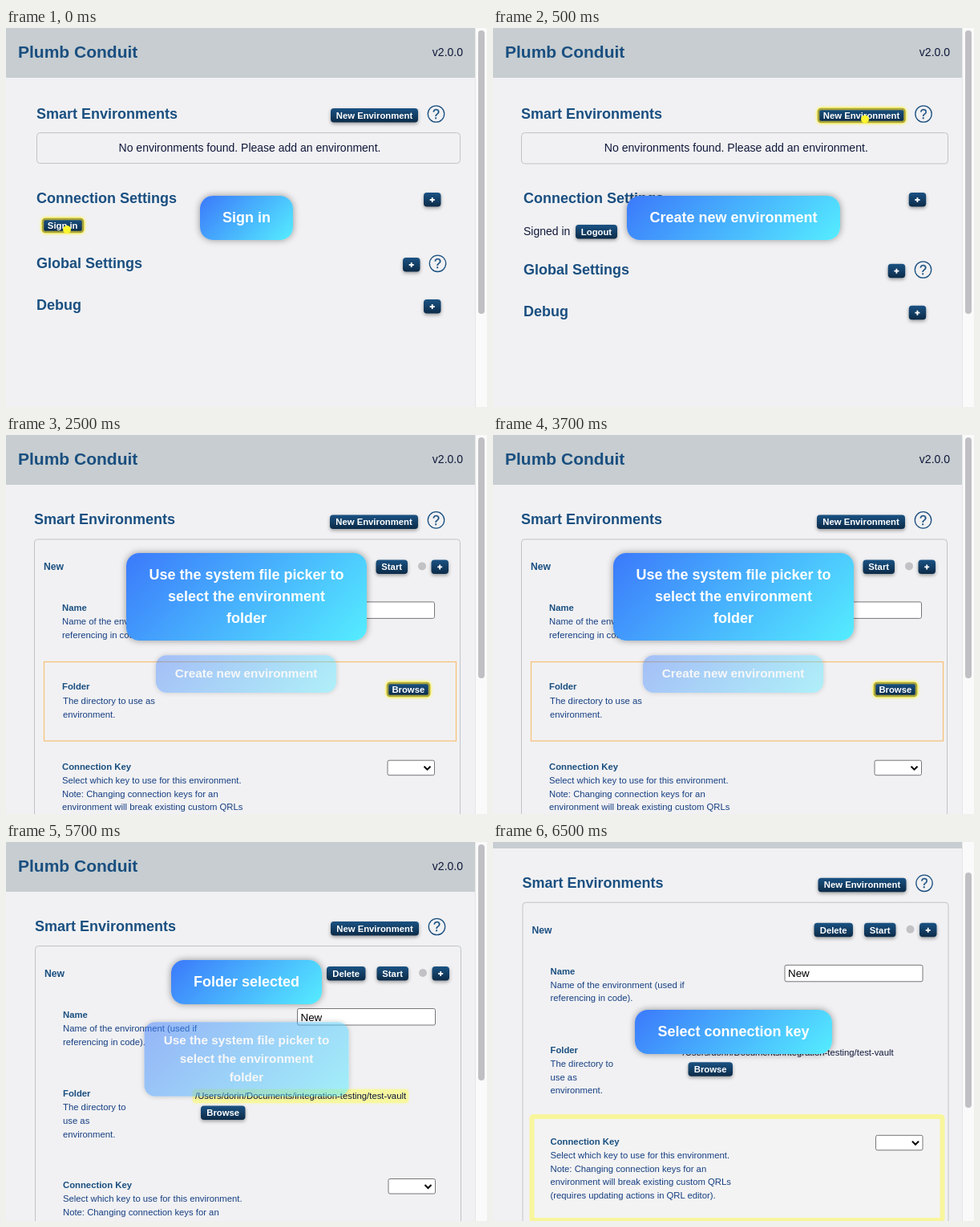
An HTML page for the animation above (8000 ms loop, 600 px wide and 472 px high).

```html
<!DOCTYPE html>
<html lang="en">
<head>
<meta charset="utf-8">
<title>Settings walkthrough</title>
<style>
  html, body { margin: 0; width: 100%; height: 100%; overflow: hidden; background: #f1f1f3; }
  body { font-family: "Liberation Sans", Arial, Helvetica, sans-serif; }

  .scene { position: absolute; left: 0; top: 0; width: 600px; height: 472px; overflow: hidden; opacity: 0; animation: 8s step-end infinite; }
  .scene svg { position: absolute; left: 0; top: 0; }
  #signin { animation-name: signin; }
  #create { animation-name: create; }
  #browse { animation-name: browse; }
  #picked { animation-name: picked; }
  #key    { animation-name: key; }
  @keyframes signin { 0% { opacity: 1 } 6.25%, 100% { opacity: 0 } }
  @keyframes create { 0% { opacity: 0 } 6.25% { opacity: 1 } 31.25%, 100% { opacity: 0 } }
  @keyframes browse { 0% { opacity: 0 } 31.25% { opacity: 1 } 56.25%, 100% { opacity: 0 } }
  @keyframes picked { 0% { opacity: 0 } 56.25% { opacity: 1 } 81.25%, 100% { opacity: 0 } }
  @keyframes key    { 0% { opacity: 0 } 81.25%, 100% { opacity: 1 } }

  .toasts { position: absolute; inset: 0; display: flex; flex-direction: column; align-items: center; justify-content: center; gap: 14px; }
  .toast {
    box-sizing: border-box; padding: 14px 28px; border-radius: 16px;
    font: bold 18px/27px "Liberation Sans", Arial, Helvetica, sans-serif;
    color: #fff; text-align: center; white-space: nowrap;
    background: linear-gradient(135deg, #3b79fb, #55edff);
    box-shadow: 0 0 8px rgba(0, 0, 0, .4);
  }
  .wide { width: 300px; }
  .old { transform: scale(.85); opacity: .42; }
  .old.wide { opacity: .5; }

  .h1 { font: bold 21px "Liberation Sans", Arial, sans-serif; fill: #1a4f80; }
  .h2 { font: bold 18px "Liberation Sans", Arial, sans-serif; fill: #1a4f80; }
  .h3 { font: bold 12.2px "Liberation Sans", Arial, sans-serif; fill: #1a4f80; }
  .h4 { font: bold 11.3px "Liberation Sans", Arial, sans-serif; fill: #1a4f80; }
  .p  { font-size: 14px; fill: #10183a; }
  .s  { font-size: 11.3px; fill: #163f82; }
  .path { font-size: 11.3px; fill: #10183a; }
  .val { font-size: 13.4px; fill: #000; }
  .lit .h4, .lit .s { fill: #1f57a3; }
  .b { fill: url(#navy); filter: drop-shadow(0 2px 2px rgba(0, 0, 0, .35)); }
  .hot { fill: url(#navy); stroke: #a9a43c; stroke-width: 2.5; filter: drop-shadow(0 0 1.5px #fff64a) drop-shadow(0 0 1.5px #fff64a); }
  .bt { font: bold 11.3px "Liberation Sans", Arial, sans-serif; fill: #fff; text-anchor: middle; }
  .box { fill: none; stroke: #c0c3c7; }
  .field { fill: #fff; stroke: #76767a; }
  .thumb { fill: #c0c0c4; }
  .dot { fill: #fbf52f; }
</style>
</head>
<body>

<svg width="600" height="472" style="position:absolute;left:0;top:0">
  <defs>
    <linearGradient id="navy" x2="0" y2="1">
      <stop stop-color="#1a5283"/><stop offset="1" stop-color="#0c2b48"/>
    </linearGradient>

    <g id="top">
      <rect width="585" height="62" fill="#c7cdd0"/>
      <text class="h1" x="15" y="37">Plumb Conduit</text>
      <text class="p" x="570" y="35" text-anchor="end">v2.0.0</text>
    </g>

    <g id="plus">
      <rect class="b" width="21.5" height="17.5" rx="4"/>
      <path d="M7.7 9H13.7M10.7 6V12" stroke="#fff" stroke-width="1.8"/>
    </g>

    <g id="help">
      <circle r="10.2" fill="none" stroke="#1a4f80" stroke-width="1.3"/>
      <text y="5.6" font-size="16" text-anchor="middle" fill="#1a4f80" stroke="#1a4f80" stroke-width=".3">?</text>
    </g>

    <g id="card">
      <text class="h2" x="36" y="111">Smart Environments</text>
      <rect class="b" x="405" y="99" width="110" height="17.5" rx="4"/>
      <text class="bt" x="460" y="111.5">New Environment</text>
      <use href="#help" x="537.5" y="105.5"/>
      <rect class="box" x="36.5" y="129.5" width="531" height="460" rx="4"/>
      <text class="h3" x="48" y="168">New</text>
      <rect class="b" x="462.5" y="155" width="39.5" height="17.5" rx="4"/>
      <text class="bt" x="482.2" y="168">Start</text>
      <circle cx="520" cy="163" r="5" fill="#c2c2c6"/>
      <use href="#plus" x="531.5" y="155"/>
      <text class="h4" x="71" y="219">Name</text>
      <text class="s" x="71" y="236">Name of the environment (used if</text>
      <text class="s" x="71" y="252.7">referencing in code).</text>
      <rect class="field" x="363.5" y="207.5" width="172" height="20.5" rx="2"/>
      <text class="val" x="367.5" y="222.5">New</text>
      <text class="h4" x="71" y="317">Folder</text>
    </g>

    <g id="folder">
      <rect class="b" x="400" y="155" width="48.5" height="17.5" rx="4"/>
      <text class="bt" x="424.2" y="168">Delete</text>
      <text class="s" x="71" y="334">The directory to</text>
      <text class="s" x="71" y="351">use as</text>
      <text class="s" x="71" y="367.5">environment.</text>
      <text class="path" x="236" y="320">/Users/dorin/Documents/integration-testing/test-vault</text>
      <rect class="b" x="243" y="328.5" width="55.5" height="17.5" rx="4"/>
      <text class="bt" x="270.7" y="341">Browse</text>
    </g>

    <g id="keys">
      <text class="h4" x="71" y="431">Connection Key</text>
      <text class="s" x="71" y="448">Select which key to use for this environment.</text>
      <text class="s" x="71" y="465">Note: Changing connection keys for an</text>
      <text class="s" x="71" y="481.5">environment will break existing custom QRLs</text>
      <text class="s" x="71" y="498">(requires updating actions in QRL editor).</text>
      <rect class="field" x="477" y="419.5" width="58.5" height="18.5" rx="2"/>
      <path d="M522.5 427L526.5 431L530.5 427" fill="none" stroke="#000" stroke-width="2"/>
    </g>
  </defs>
  <rect x="585" width="15" height="472" fill="#fafafa"/>
  <path d="M585.5 0V472" stroke="#e6e6e8"/>
</svg>

<div class="scene" id="signin">
  <svg width="600" height="472">
    <use href="#top"/>
    <rect class="thumb" x="589" y="3" width="8" height="353" rx="4"/>
    <text class="h2" x="38" y="113">Smart Environments</text>
    <rect class="b" x="405" y="100" width="109" height="17.5" rx="4"/>
    <text class="bt" x="459.5" y="113">New Environment</text>
    <use href="#help" x="536.5" y="107"/>
    <rect class="box" x="38.5" y="130.5" width="528" height="38" rx="4"/>
    <text class="p" x="304" y="154" text-anchor="middle">No environments found. Please add an environment.</text>
    <text class="h2" x="38" y="218">Connection Settings</text>
    <use href="#plus" x="521" y="205"/>
    <rect class="hot" x="46" y="238" width="50" height="16" rx="3"/>
    <text class="bt" x="70.7" y="250">Sign in</text>
    <circle class="dot" cx="76" cy="251" r="5"/>
    <text class="h2" x="38" y="299">Global Settings</text>
    <use href="#plus" x="495" y="286"/>
    <use href="#help" x="538.5" y="293.3"/>
    <text class="h2" x="38" y="351">Debug</text>
    <use href="#plus" x="521" y="338"/>
  </svg>
  <div class="toasts"><div class="toast">Sign in</div></div>
</div>

<div class="scene" id="create">
  <svg width="600" height="472">
    <use href="#top"/>
    <rect class="thumb" x="589" y="3" width="8" height="353" rx="4"/>
    <text class="h2" x="35" y="113">Smart Environments</text>
    <rect class="hot" x="406" y="101" width="107.5" height="16" rx="3"/>
    <text class="bt" x="459.5" y="113">New Environment</text>
    <circle class="dot" cx="464" cy="113.5" r="5"/>
    <use href="#help" x="537" y="107"/>
    <rect class="box" x="35.5" y="130.5" width="532" height="38.5" rx="4"/>
    <text class="p" x="303.3" y="154" text-anchor="middle" style="font-size:14.1px">No environments found. Please add an environment.</text>
    <text class="h2" x="38" y="218">Connection Settings</text>
    <use href="#plus" x="518.7" y="205"/>
    <text class="p" x="38" y="258">Signed in</text>
    <rect class="b" x="103" y="245" width="52" height="17.5" rx="4"/>
    <text class="bt" x="129" y="258">Logout</text>
    <text class="h2" x="38" y="307">Global Settings</text>
    <use href="#plus" x="492.7" y="293.7"/>
    <use href="#help" x="536.5" y="301"/>
    <text class="h2" x="38" y="359">Debug</text>
    <use href="#plus" x="518.7" y="345.7"/>
  </svg>
  <div class="toasts"><div class="toast">Create new environment</div></div>
</div>

<div class="scene" id="browse">
  <svg width="600" height="472">
    <use href="#top"/>
    <rect class="thumb" x="589" y="3" width="8" height="300" rx="4"/>
    <use href="#card" x="-1" y=".4"/>
    <rect x="47.5" y="282.5" width="514" height="98.5" fill="none" stroke="#f6c27a" stroke-width="1.3"/>
    <text class="s" x="71" y="335">The directory to use as</text>
    <text class="s" x="71" y="352">environment.</text>
    <rect class="hot" x="476" y="309" width="52" height="16" rx="3"/>
    <text class="bt" x="501.8" y="321">Browse</text>
    <use href="#keys" x="-1" y="-14.3"/>
  </svg>
  <div class="toasts">
    <div class="toast wide">Use the system file picker to<br>select the environment<br>folder</div>
    <div class="toast old">Create new environment</div>
  </div>
</div>

<div class="scene" id="picked">
  <svg width="600" height="472">
    <use href="#top"/>
    <rect class="thumb" x="589" y="3" width="8" height="294" rx="4"/>
    <use href="#card"/>
    <rect x="233" y="308" width="269" height="17" rx="4" fill="#f7f7a0" style="filter:drop-shadow(0 0 1.5px #f7f7a0)"/>
    <use href="#folder"/>
    <use href="#keys"/>
  </svg>
  <div class="toasts">
    <div class="toast">Folder selected</div>
    <div class="toast old wide">Use the system file picker to<br>select the environment<br>folder</div>
  </div>
</div>

<div class="scene" id="key">
  <svg width="600" height="472">
    <use href="#top" y="-54"/>
    <rect class="thumb" x="589" y="38" width="8" height="293" rx="4"/>
    <use href="#card" x=".5" y="-54.2"/>
    <use href="#folder" x=".5" y="-54.2"/>
    <rect x="48.5" y="342" width="512" height="129" rx="2" fill="#f3f3f3" stroke="#f8f69c" stroke-width="6"/>
    <g class="lit"><use href="#keys" x=".5" y="-54.2"/></g>
  </svg>
  <div class="toasts"><div class="toast">Select connection key</div></div>
</div>

</body>
</html>
```
